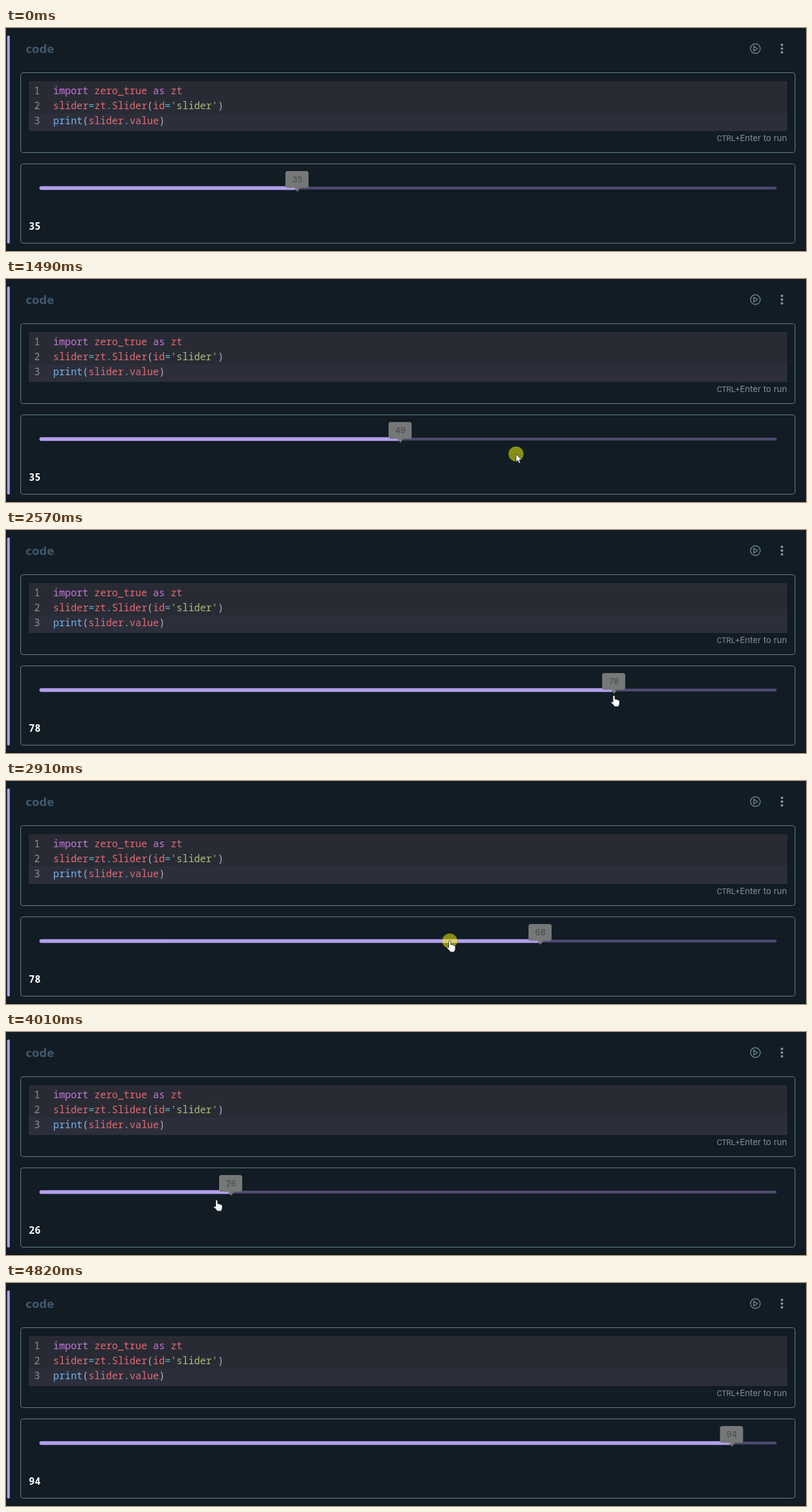
Animation of 1280 by 357 pixels, one loop 5.57 s. Source, as an HTML page:

```html
<!DOCTYPE html>
<html lang="en">
<head>
<meta charset="utf-8">
<title>Slider cell</title>
<style>
  html, body { margin: 0; width: 100%; height: 100%; overflow: hidden; background: #111c24; }
  svg { display: block; width: 100vw; height: 100vh; }
  text { white-space: pre; }
  .mono { font: 500 15.67px "Noto Sans Mono", monospace; fill: #abb2bf; }
  .ui { font-family: Inter, sans-serif; }
  .title { font: 700 17px "DejaVu Sans", sans-serif; fill: #3f566b; }
  .keys { font: 12.5px Roboto, sans-serif; }
  .num { fill: #8a8f98; }
  .kw { fill: #c678dd; }
  .id { fill: #e06c75; }
  .op { fill: #56b6c2; }
  .str { fill: #a5c07b; }
  .fn { fill: #74b3ee; }
  .panel { fill: none; stroke: #648290; }
  .cursor { fill: #fff; stroke: #10161b; stroke-width: .8; stroke-linejoin: round; }
  #output { fill: #fff; font-weight: 600; }
</style>
</head>
<body>
<svg viewBox="0 0 1280 357">
  <rect width="1280" height="357" fill="#111c24"/>
  <rect y="355" width="1280" height="2" fill="#0d161c"/>
  <rect x="1.8" y="12" width="4.3" height="333" rx="2" fill="#ae9fe8"/>

  <text class="title" x="31.5" y="39.5">code</text>
  <g fill="none" stroke="#6d8998" stroke-width="1.4" stroke-linejoin="round">
    <circle cx="1199" cy="33" r="7.8"/>
    <path d="M1196.4 29.2v7.6l6-3.8z"/>
  </g>
  <g fill="#7d97a5">
    <circle cx="1241.5" cy="27" r="2.1"/>
    <circle cx="1241.5" cy="33" r="2.1"/>
    <circle cx="1241.5" cy="39" r="2.1"/>
  </g>

  <rect class="panel" x="23.5" y="71.5" width="1239" height="128" rx="4"/>
  <rect x="36.5" y="85" width="1213.5" height="80" fill="#292b34"/>
  <rect x="36.5" y="137" width="1213.5" height="27.5" fill="#2c2f3b"/>
  <g class="mono">
    <text class="num" x="45" y="106">1</text>
    <text class="num" x="45" y="130">2</text>
    <text class="num" x="45" y="154">3</text>
    <text x="75.5" y="106"><tspan class="kw">import</tspan> <tspan class="id">zero_true</tspan> <tspan class="kw">as</tspan> <tspan class="id">zt</tspan></text>
    <text x="75.5" y="130"><tspan class="id">slider</tspan><tspan class="op">=</tspan><tspan class="id">zt</tspan><tspan class="op">.</tspan><tspan class="id">Slider</tspan>(<tspan class="id">id</tspan><tspan class="op">=</tspan><tspan class="str">'slider'</tspan>)</text>
    <text x="75.5" y="154"><tspan class="fn">print</tspan>(<tspan class="id">slider</tspan><tspan class="op">.</tspan><tspan class="id">value</tspan>)</text>
  </g>
  <text class="ui" x="1249.5" y="180.5" font-size="13.7" fill="#898d95" text-anchor="end"><tspan class="keys">CTRL+</tspan>Enter to run</text>

  <rect class="panel" x="23.5" y="217.5" width="1239" height="127" rx="4"/>
  <rect x="53.5" y="254" width="1179.5" height="4.6" rx="2.3" fill="#4f4b70"/>
  <rect id="fill" x="53.5" y="253.3" height="6" rx="3" fill="#b29fea"/>
  <g id="tip">
    <path d="M-5 255.5h10l-5 6.8z" fill="#757877"/>
    <rect x="-19" y="229" width="37" height="26.8" rx="3.5" fill="#757877"/>
    <text id="label" class="ui" y="247.4" font-size="13.5" fill="#444b50" text-anchor="middle"></text>
  </g>
  <text id="output" class="mono" x="36.5" y="323"></text>

  <g id="pointer">
    <circle id="press" r="12" fill="#ff0" opacity=".5"/>
    <path id="arrow" class="cursor" d="M0 0v13l2.9-2.6 2.1 4.6 2.2-1-2-4.4h4z"/>
    <path id="hand" class="cursor" d="M-1.6 1.4Q-1.5 0 0 0T1.6 1.4V6q2-.8 2.8.6 1.8-.6 2.5.8 2.1-.3 2.1 1.8v3.2q0 2.2-1.3 3.6v1.8H.2v-1.6L-4.4 11.6Q-4.9 9.6-3.2 9.6L-1.6 11z"/>
  </g>
</svg>
<script>
const $ = id => document.getElementById(id);
const LOOP = 5570, STEP = 67, EARLY = 15;
const LEFT = 53.6, UNIT = 11.785, FIRST = 35, PRINT_DELAY = 210;

// Each move goes on from the last: start, steps, goal, ease (above 1 slows down, below 1 speeds up)
const entry = { x: 1442, y: 404 };
const moves = [
  { start: 330, steps: 3, x: 661, y: 226 },
  { start: 690, steps: 9, x: 464, y: 263, ease: 2 },
  { start: 1430, steps: 2, x: 816, y: 280, ease: .9 },
  { start: 1565, steps: 2, x: 976, y: 283, ease: 2 },
  { start: 2360, steps: 6, x: 971, y: 256 },
  { start: 2840, steps: 2, x: 710, y: 256, ease: .85 },
  { start: 2980, steps: 2, x: 361, y: 264 },
  { start: 3740, steps: 3, x: 323, y: 272 },
  { start: 3940, steps: 3, x: 361, y: 264, ease: .42 },
  { start: 4150, steps: 3, x: 1078, y: 313 },
  { start: 4350, steps: 1, x: 1165, y: 331 },
  { start: 4760, steps: 2, x: 1300, y: 371 }
];
const drags = [
  { press: 1370, release: 1690 },
  { press: 2772, release: 3060 },
  { press: 4083, release: 4350 }
];

const clamp = (v, lo, hi) => Math.min(hi, Math.max(lo, v));
const mix = (a, b, f) => a + (b - a) * f;

// The pointer is redrawn once per STEP while it moves
function pointerAt(t) {
  let at = entry;
  for (const { start, steps, x, y, ease = 1 } of moves) {
    const done = clamp(Math.floor((t - start + EARLY) / STEP) + 1, 0, steps);
    const f = 1 - (1 - done / steps) ** ease;
    at = { x: mix(at.x, x, f), y: mix(at.y, y, f) };
  }
  return at;
}

const valueAt = t => Math.round((pointerAt(t).x - LEFT) / UNIT);

// The slider trails the pointer by one step
function sliderAt(t) {
  const drag = drags.findLast(d => d.press <= t);
  return drag ? valueAt(clamp(t - STEP, drag.press, drag.release)) : FIRST;
}

function printedAt(t) {
  const drag = drags.findLast(d => d.release + PRINT_DELAY <= t);
  return drag ? valueAt(drag.release) : FIRST;
}

const show = (id, on) => $(id).setAttribute("visibility", on ? "visible" : "hidden");

function draw(t) {
  const value = sliderAt(t), x = LEFT + value * UNIT;
  $("fill").setAttribute("width", x - 53.5);
  $("tip").setAttribute("transform", `translate(${x})`);
  $("label").textContent = value;
  $("output").textContent = printedAt(t);

  const p = pointerAt(t), overTrack = p.y > 238 && p.y < 275;
  $("pointer").setAttribute("transform", `translate(${p.x} ${p.y})`);
  show("arrow", !overTrack);
  show("hand", overTrack);
  show("press", drags.some(d => t >= d.press && t < d.release));
}

const begin = performance.now();
function frame() {
  draw((performance.now() - begin) % LOOP);
  requestAnimationFrame(frame);
}
frame();
</script>
</body>
</html>
```
